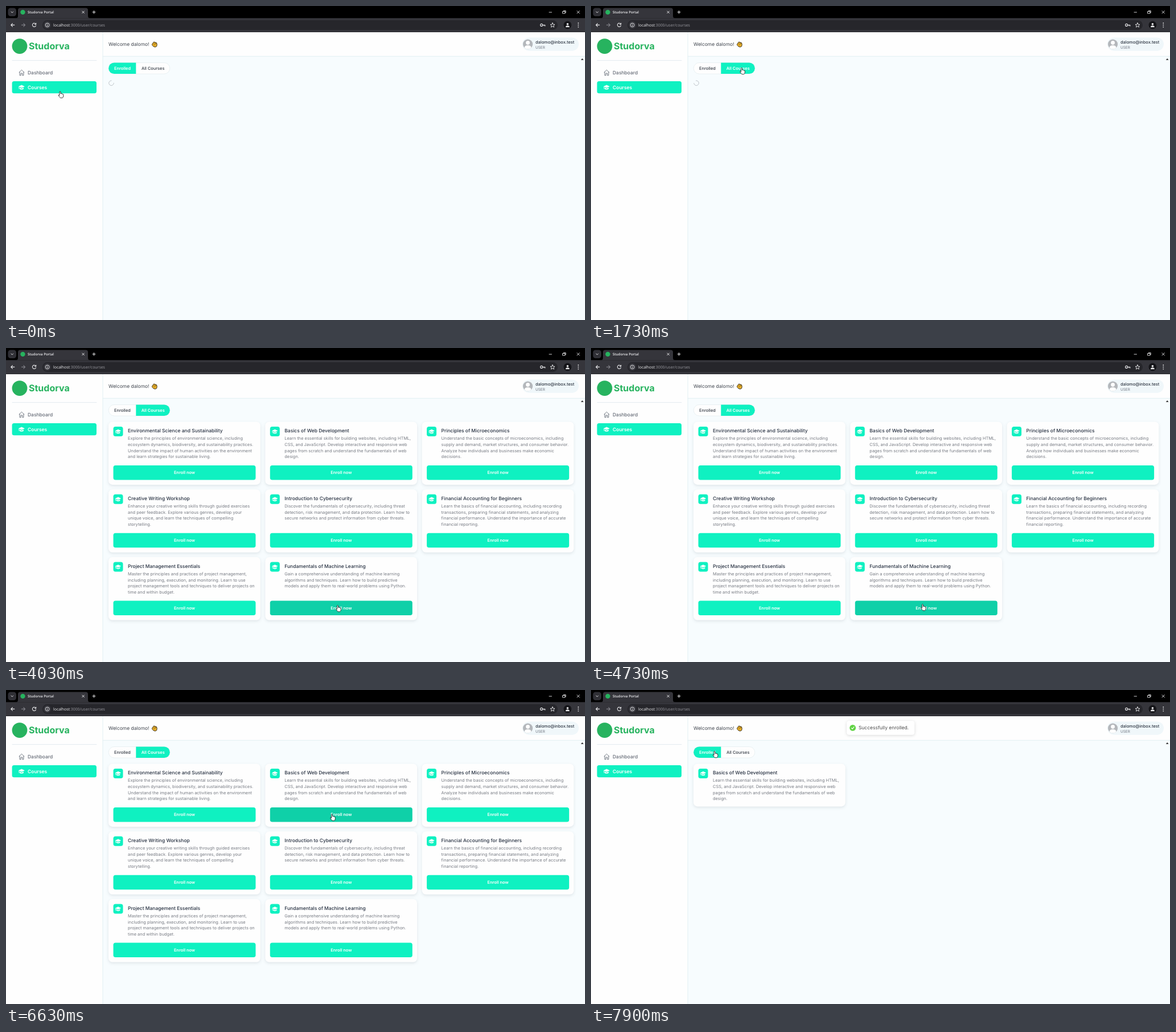
Write an HTML page that moves like this. It is 1017 px wide and 551 px high and loops after 8 s.

```html
<!DOCTYPE html>
<html lang="en">
<head>
<meta charset="utf-8">
<title>Course portal</title>
<style>
html, body { margin: 0; width: 100%; height: 100%; overflow: hidden; background: #f7fcfe; }
svg { display: block; width: 1017px; height: 551px; }
text { font-family: Inter, sans-serif; font-size: 7.42px; text-rendering: geometricPrecision; white-space: pre; }
.ui { font-family: "Open Sans", sans-serif; }
.line { fill: none; stroke-linecap: round; stroke-linejoin: round; }
.card { fill: #fefefe; filter: drop-shadow(0 2.6px 2.4px rgba(30, 50, 60, .11)); }
.title { font-size: 8.47px; font-weight: 500; fill: #263040; }
.desc { fill: #777b83; }
.mid { text-anchor: middle; font-weight: 600; fill: #fff; }
</style>
</head>
<body>
<svg id="stage" viewBox="0 0 1017 551"></svg>
<script>
const LOOP = 8000, TEAL = '#0ff1c1', DARK = [15, 208, 168], LIGHT = [15, 241, 193];

const courses = [
  ['Environmental Science and Sustainability',
    'Explore the principles of environmental science, including',
    'ecosystem dynamics, biodiversity, and sustainability practices.',
    'Understand the impact of human activities on the environment',
    'and learn strategies for sustainable living.'],
  ['Basics of Web Development',
    'Learn the essential skills for building websites, including HTML,',
    'CSS, and JavaScript. Develop interactive and responsive web',
    'pages from scratch and understand the fundamentals of web',
    'design.'],
  ['Principles of Microeconomics',
    'Understand the basic concepts of microeconomics, including',
    'supply and demand, market structures, and consumer behavior.',
    'Analyze how individuals and businesses make economic',
    'decisions.'],
  ['Creative Writing Workshop',
    'Enhance your creative writing skills through guided exercises',
    'and peer feedback. Explore various genres, develop your',
    'unique voice, and learn the techniques of compelling',
    'storytelling.'],
  ['Introduction to Cybersecurity',
    'Discover the fundamentals of cybersecurity, including threat',
    'detection, risk management, and data protection. Learn how to',
    'secure networks and protect information from cyber threats.'],
  ['Financial Accounting for Beginners',
    'Learn the basics of financial accounting, including recording',
    'transactions, preparing financial statements, and analyzing',
    'financial performance. Understand the importance of accurate',
    'financial reporting.'],
  ['Project Management Essentials',
    'Master the principles and practices of project management,',
    'including planning, execution, and monitoring. Learn to use',
    'project management tools and techniques to deliver projects on',
    'time and within budget.'],
  ['Fundamentals of Machine Learning',
    'Gain a comprehensive understanding of machine learning',
    'algorithms and techniques. Learn how to build predictive',
    'models and apply them to real-world problems using Python.']
];

const rect = (x, y, w, h, r, fill, more = '') =>
  `<rect x="${x}" y="${y}" width="${w}" height="${h}" rx="${r}" fill="${fill}" ${more}/>`;
const circle = (x, y, r, fill, more = '') => `<circle cx="${x}" cy="${y}" r="${r}" fill="${fill}" ${more}/>`;
const text = (x, y, s, more = '') => `<text x="${x}" y="${y}" ${more}>${s}</text>`;
const line = (d, color, w = 1) => `<path class="line" d="${d}" stroke="${color}" stroke-width="${w}"/>`;
const shape = (d, fill, more = '') => `<path d="${d}" fill="${fill}" ${more}/>`;
const at = (x, y, body, s = 1) => `<g transform="translate(${x} ${y}) scale(${s})">${body}</g>`;

const cap = shape('M-5.5-1.4L0-4L5.5-1.4L0 1.2ZM-3.5.7V2.8Q0 5.2 3.5 2.8V.7L0 2.4Z', '#fff')
  + line('M-4.6-.8V2.6', '#fff', .8);

function chrome() {
  const w = '#e8e8ea';
  return rect(0, 0, 1017, 46, 0, '#000')
    + rect(3.5, 3.5, 14.5, 14.5, 4.5, '#303036') + line('M9 10L10.8 11.8L12.6 10', w)
    + shape('M17 21.5Q21 21.5 21 17.5V7.5Q21 3.5 25 3.5H140Q144 3.5 144 7.5V17.5Q144 21.5 148 21.5Z', '#35353b')
    + rect(0, 21.3, 1017, 24.5, 0, '#35353b')
    + circle(29.5, 10.9, 4.2, '#27b35f')
    + text(38, 13.1, 'Studorva Portal', 'class="ui" fill="#f0f0f2" style="font-size:6.1px;font-weight:600"')
    + line('M133.8 9L137.4 12.6M137.4 9L133.8 12.6M154.5 8.3V13.3M152 10.8H157', w)
    + line('M954 11H958.5M1003 8.6L1007.4 13M1007.4 8.6L1003 13M978 9.5H982V13H978ZM979.3 9.3V8.3H983.2V11.8H982.2', w, .9)
    + line('M14.8 33.4H8.8M11.5 30.6L8.7 33.4L11.5 36.2', w, 1.1)
    + line('M27.5 33.4H33.5M30.8 30.6L33.6 33.4L30.8 36.2', '#818187', 1.1)
    + line('M52.4 31.8A3.2 3.2 0 1 0 52.6 34.4M52.7 30V32.2H50.5', w, 1.1)
    + rect(64, 25, 905, 17, 8.5, '#26262b')
    + circle(72.6, 33.4, 6.3, '#3a3a40') + circle(72.6, 33.4, 3.4, 'none', `stroke="${w}" stroke-width=".9"`)
    + line('M72.6 33.2V35M72.6 31.7V31.8', w, .9)
    + text(83, 36, 'localhost<tspan fill="#9b9ba1">:3000/user/courses</tspan>', 'class="ui" fill="#f2f2f4" style="font-size:6.92px"')
    + circle(940.6, 33.4, 2, 'none', `stroke="${w}" stroke-width="1.1"`) + line('M942.7 33.4H947V35.2M945 33.4V35', w)
    + line('M960 29.5L961.1 32.2L964 32.4L961.8 34.3L962.5 37.2L960 35.6L957.5 37.2L958.2 34.3L956 32.4L958.9 32.2Z', w, .9)
    + circle(986.4, 33.4, 6.8, '#141418') + circle(986.4, 31.7, 1.8, w) + shape('M982.9 37.2Q983 34.2 986.4 34.2T989.9 37.2Z', w)
    + [30, 33.4, 36.8].map(y => circle(1005.3, y, .9, w)).join('');
}

function shell() {
  const wave = shape('M-3.6-1.5L-1.9-4.2Q-.8-5.2 0-4L3.5-3Q5 0 3.6 3.2Q1.2 5.6-1.8 3.6L-4.4.8Q-4.8-.7-3.6-1.5Z', '#efb52c', 'stroke="#3b3120" stroke-width="1"')
    + line('M-2.4-1.2L.5 1.2M-.8-2.8L1.8-.4M1-3.4L2.8-1.2', '#5a4212', .7);
  return rect(0, 45.8, 1017, 506, 0, '#f7fcfe') + rect(0, 45.8, 170, 506, 0, '#fefefe')
    + rect(170, 45.8, 847, 42.4, 0, '#fefefe')
    + line('M170 46V551M170.5 88.3H1017', '#dfeff2', .9) + line('M11 95.6H159', '#dfe7ee', .9)
    + circle(24, 70.6, 13.4, '#27b35f')
    + text(40, 76, 'Studorva', 'fill="#27b35f" style="font-size:16px;font-weight:700"')
    + line('M23 116.6L27.5 112.2L32 116.6M24.1 115.8V121.8H26.2V118H28.8V121.8H30.9V115.8', '#646b76', .9)
    + text(38, 120.2, 'Dashboard', 'fill="#666c77" style="font-size:8.47px;font-weight:500"')
    + rect(10.6, 132, 148.4, 21.3, 3.6, TEAL) + at(27.4, 142.6, cap)
    + text(38, 145.7, 'Courses', 'fill="#fff" style="font-size:8.47px;font-weight:600"')
    + text(180, 70.4, 'Welcome dalomo!', 'fill="#41464f" style="font-size:8.47px"') + at(261, 67.6, wave)
    + rect(907, 55.4, 99, 23.4, 11.7, '#f0f7fa')
    + circle(916.6, 67, 8.6, '#b4b7bb') + circle(916.6, 64.5, 3.4, '#fff')
    + shape('M910.7 73.2Q911 69 916.6 69T922.5 73.2Q919.8 75.5 916.6 75.5T910.7 73.2Z', '#fff')
    + text(930, 65.6, 'dalomo@inbox.test', 'fill="#303844" style="font-weight:500"')
    + text(930, 74.7, 'USER', 'fill="#6b717c" style="font-size:6.36px"')
    + shape('M1009.8 94.8L1012.2 92L1014.6 94.8Z', '#222');
}

function tabs(all) {
  const half = all ? 'M228.3 99.5H278A9.8 9.8 0 0 1 278 119.1H228.3Z' : 'M228.3 99.5H190A9.8 9.8 0 0 0 190 119.1H228.3Z';
  const label = (x, s, on) => text(x, 111.8, s, `text-anchor="middle" fill="${on ? '#fff' : '#363c46'}" style="font-weight:${on ? 600 : 500}"`);
  return rect(180.2, 99.5, 107.6, 19.6, 9.8, '#fefefe', 'stroke="#e3ebee" stroke-width=".7"')
    + shape(half, TEAL) + label(204.5, 'Enrolled', !all) + label(258.2, 'All Courses', all);
}

// Places cards in three columns; returns markup and hit areas.
function grid(list, canEnroll) {
  const out = { html: '', buttons: [], texts: [] };
  let y = 129.4;
  for (let i = 0; i < list.length; i += 3) {
    const row = list.slice(i, i + 3);
    const lines = Math.max(...row.map(c => c.length - 1));
    const h = 67.9 + (lines - 4) * 10.6 + (canEnroll ? 42.6 : 7.1);
    row.forEach(([title, ...desc], col) => {
      const x = 180 + col * 275.3;
      out.html += rect(x, y, 266.8, h, 7, '#fefefe', 'class="card"')
        + rect(x + 8.5, y + 8.6, 17, 17, 3.8, TEAL) + at(x + 17, y + 17.1, cap, .95)
        + text(x + 34, y + 18.6, title, 'class="title"')
        + desc.map((s, k) => text(x + 34, y + 31.9 + k * 10.6, s, 'class="desc"')).join('');
      out.texts.push([x + 34, y + 10, 224, 14 + desc.length * 10.6]);
      if (canEnroll) {
        const box = [x + 8.5, y + h - 34, 250, 25.6];
        out.buttons.push(box);
        out.html += rect(...box, 3.8, TEAL, 'class="btn"') + text(x + 133.5, y + h - 18.5, 'Enroll now', 'class="mid"');
      }
    });
    y += h + 8.3;
  }
  return out;
}

const empty = { html: '', buttons: [], texts: [] };
const views = [
  { from: 0, all: false, busy: true, ...empty },
  { from: 800, all: false, ...empty },
  { from: 1700, all: true, busy: true, ...empty },
  { from: 1900, all: true, ...grid(courses, true) },
  { from: 6850, all: true, ...grid(courses.filter((c, i) => i !== 1), true) },
  { from: 7800, all: false, busy: true, ...empty },
  { from: 7865, all: false, ...grid([courses[1]], false) }
];

const pointers = {
  hand: shape('M-1 .9Q-1 0 0 0Q1 0 1 .9V4Q1.2 3.2 2 3.3Q2.8 3.4 2.8 4.3Q3.2 3.6 4 3.9Q4.6 4.2 4.5 5Q5.2 4.5 5.8 5.2V8Q5.6 10.8 4 11.2H.6Q-.6 10.4-2.8 7Q-3 6-2.2 6Q-1.6 6-1 7Z', '#fff', 'stroke="#111" stroke-width=".8"'),
  beam: line('M-1.8-5.6Q0-5.6 0-4.6V4.6Q0 5.6-1.8 5.6M1.8-5.6Q0-5.6 0-4.6M0 4.6Q0 5.6 1.8 5.6', '#222', .8),
  arrow: shape('M0 0V9.5L2.2 7.4L3.7 10.8L5.2 10.1L3.8 6.9H6.8Z', '#fff', 'stroke="#111" stroke-width=".7"')
};

const arc = r => `M0 ${-r}A${r} ${r} 0 1 0 ${r} 0`;
const stage = document.getElementById('stage');
stage.innerHTML = shell()
  + views.map((v, i) => `<g id="view${i}">${tabs(v.all)}${v.html}</g>`).join('')
  + `<g id="spinner">${line(arc(4.3), '#b9bec4', .9)}</g>`
  + `<g id="toast">${rect(-59.6, -12.4, 119.2, 24.8, 4.2, '#fff', 'style="filter:drop-shadow(0 1.5px 2.6px rgba(0,0,0,.15))"')}
    <g id="loader">${circle(0, 0, 3.2, 'none', 'stroke="#e0e0e0"')}${line('M3.2 0A3.2 3.2 0 0 1 0 3.2', '#616161')}</g>
    <g id="badge">${circle(0, 0, 5.4, '#61d345')}<path id="tick" class="line" d="M-2.2.2L-.6 1.9L2.4-1.7" stroke="#fff" stroke-width="1.1" pathLength="1" stroke-dasharray="1 2"/></g>
    ${text(-38.8, 3, 'Successfully enrolled.', 'fill="#4c4c4c" style="font-size:8.47px"')}</g>`
  + Object.keys(pointers).map(k => `<g id="${k}">${pointers[k]}</g>`).join('')
  + chrome();

const el = id => document.getElementById(id);
const move = (id, v) => el(id).setAttribute('transform', v);
const show = (id, on) => el(id).setAttribute('display', on ? 'inline' : 'none');
const clamp = v => Math.max(0, Math.min(1, v));
const smooth = u => u * u * (3 - 2 * u);
const inside = (p, [x, y, w, h]) => p[0] >= x && p[0] <= x + w && p[1] >= y && p[1] <= y + h;
views.forEach((v, i) => { v.btns = el('view' + i).querySelectorAll('.btn'); });

function bezier(u, x1, y1, x2, y2) {
  const f = (s, a, b) => 3 * a * s * (1 - s) ** 2 + 3 * b * s * s * (1 - s) + s ** 3;
  let lo = 0, hi = 1;
  for (let i = 0; i < 20; i++) {
    const m = (lo + hi) / 2;
    if (f(m, x1, x2) < u) lo = m; else hi = m;
  }
  return f(hi, y1, y2);
}

// time, x, y of the pointer's hot spot
const track = [
  [0, 95, 150], [400, 95, 150], [1200, 264.5, 108.5], [1750, 264.5, 108.5], [2350, 249, 146],
  [2600, 249, 146], [2700, 253, 150], [2930, 253, 150], [3850, 582.5, 451.5], [4650, 582.5, 451.5],
  [5400, 580, 392], [5430, 580, 392], [5800, 576, 196], [5900, 574.5, 211], [6050, 572.5, 218],
  [7370, 572.5, 218], [7630, 217, 107.5], [LOOP, 217, 107.5]
];

function pointer(t) {
  const i = Math.max(1, track.findIndex(k => k[0] >= t));
  const [t0, x0, y0] = track[i - 1], [t1, x1, y1] = track[i];
  const u = smooth(clamp((t - t0) / (t1 - t0)));
  return [x0 + (x1 - x0) * u, y0 + (y1 - y0) * u];
}

function drawToast(t) {
  const age = t - 6850;
  show('toast', age >= 0);
  if (age < 0) return;
  const p = bezier(clamp(age / 350), .21, 1.02, .73, 1);
  move('toast', `translate(508.7 ${66.4 - 49.6 * (1 - p)}) scale(${.6 + .4 * p})`);
  el('toast').setAttribute('opacity', .5 + .5 * p);
  const grow = bezier(clamp((age - 100) / 300), .175, .885, .32, 1.275);
  move('badge', `translate(-49 0) scale(${grow})`);
  move('loader', `translate(-49 0) rotate(${age * .36}) scale(${.6 + .4 * clamp((age - 120) / 300)})`);
  show('loader', age < 400);
  el('tick').setAttribute('stroke-dashoffset', 1 - clamp((age - 300) / 200));
}

function draw(t) {
  const now = views.findLastIndex(v => t >= v.from), view = views[now];
  views.forEach((v, i) => show('view' + i, i === now));
  show('spinner', view.busy);
  move('spinner', `translate(185 135.2) rotate(${t * .36})`);

  // hover colour eases over 150 ms
  const trail = Array.from({ length: 16 }, (_, i) => pointer(Math.max(0, t - i * 10)));
  view.buttons.forEach((box, i) => {
    const u = smooth(trail.filter(p => inside(p, box)).length / 16);
    view.btns[i].setAttribute('fill', `rgb(${LIGHT.map((c, k) => Math.round(c + (DARK[k] - c) * u))})`);
  });

  const p = trail[0];
  const links = [[10.6, 132, 148.4, 21.3], [10.6, 107, 148.4, 21], [180, 99.5, 108, 19.6], ...view.buttons];
  const kind = links.some(b => inside(p, b)) ? 'hand' : view.texts.some(b => inside(p, b)) ? 'beam' : 'arrow';
  Object.keys(pointers).forEach(k => show(k, k === kind));
  move(kind, `translate(${p[0]} ${p[1]})`);
  drawToast(t);
}

const start = performance.now();
function tick() {
  draw((performance.now() - start) % LOOP);
  requestAnimationFrame(tick);
}
tick();
</script>
</body>
</html>
```
